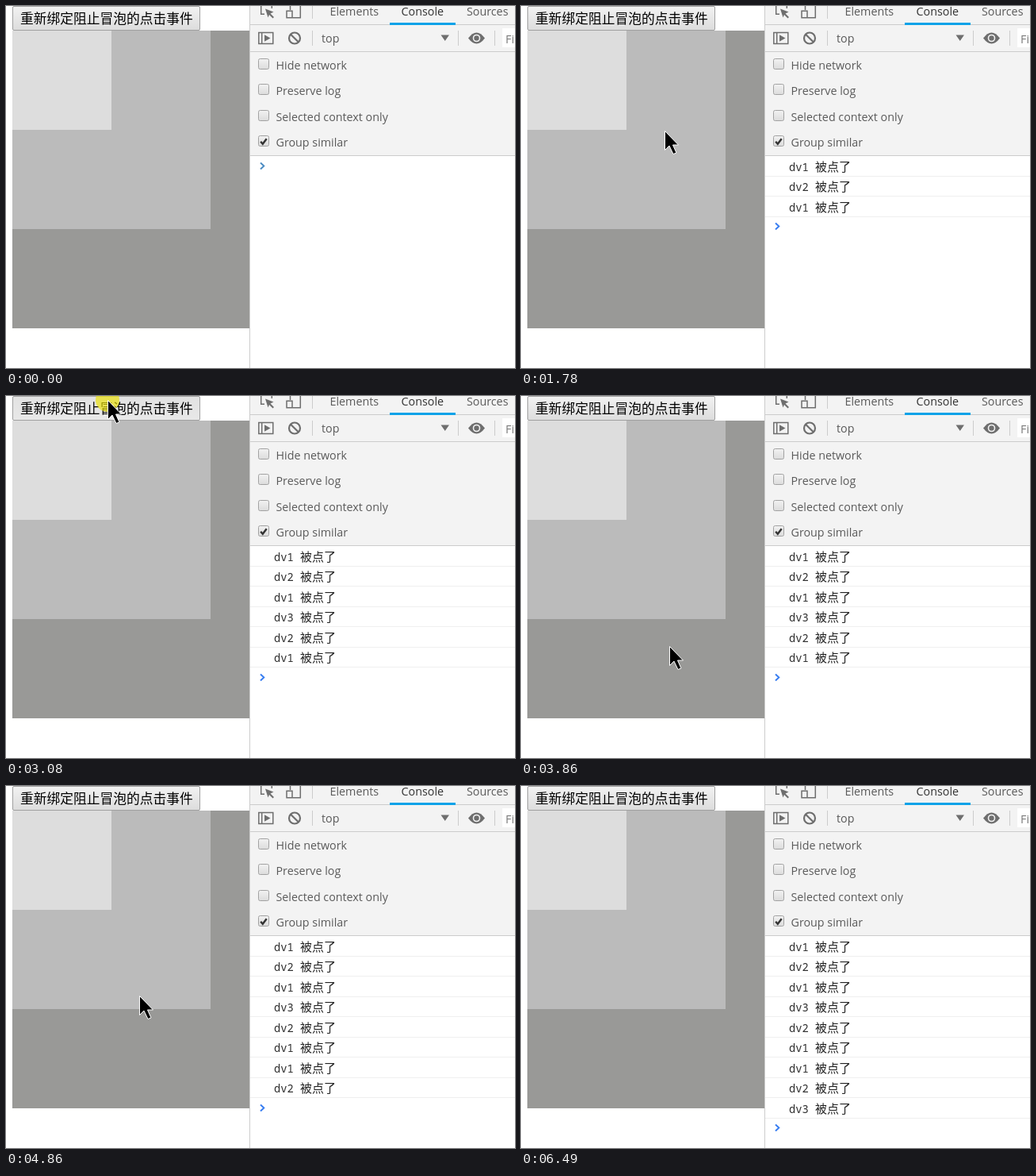
Write an HTML page that moves like this. It is 642 by 456 pixels and loops after 6.89 s.

```html
<!DOCTYPE html>
<html lang="zh-CN">
<head>
<meta charset="utf-8">
<title>Event bubbling</title>
<style>
  html, body { margin: 0; width: 100%; height: 100%; overflow: hidden; background: #fff; }
  svg { display: block; width: 642px; height: 456px; }
  text { white-space: pre; }
  .ui { font: 14.3px "Open Sans", "Noto Sans", sans-serif; fill: #5a5a5a; }
  .cjk { font: 15px "Noto Sans CJK SC", "Noto Sans CJK", sans-serif; fill: #222; }
  .mono { font: 13.75px "Noto Sans Mono", "DejaVu Sans Mono", monospace; fill: #303030; }
  .ui .selected { fill: #333; }
  .ui .hint { fill: #777; }
  .button-label { font-size: 16.75px; fill: #000; }
  .line { fill: none; stroke: #6e6e6e; stroke-width: 1.5; }
  .rule { stroke: #ccc; }
</style>
</head>
<body>
<svg viewBox="0 0 642 456">
  <defs>
    <linearGradient id="normal" x2="0" y2="1"><stop stop-color="#f2f2f2"/><stop offset="1" stop-color="#dcdcdc"/></linearGradient>
    <linearGradient id="hover" x2="0" y2="1"><stop stop-color="#f6f6f6"/><stop offset="1" stop-color="#e2e2e2"/></linearGradient>
    <linearGradient id="active" x2="0" y2="1"><stop stop-color="#e2e2e2"/><stop offset="1" stop-color="#e8e8e8"/></linearGradient>
  </defs>

  <rect x="8" y="31" width="299" height="375" fill="#999997"/>
  <rect x="8" y="31" width="250" height="250" fill="#bbb"/>
  <rect x="8" y="31" width="125" height="125" fill="#ddd"/>
  <rect id="button" x="8.5" y=".5" width="236" height="30" rx="1.5" fill="url(#normal)" stroke="#a0a0a0"/>
  <text class="cjk button-label" x="18" y="22">重新绑定阻止冒泡的点击事件</text>

  <rect x="308" width="334" height="188" fill="#f3f3f3"/>
  <path class="rule" d="M307.5 0V456M308 23.5H642M308 57.5H642M308 188.5H642M386.5 0V16M386.5 31V50M570.5 31V50M616.5 31V50"/>
  <rect x="484" y="21" width="83" height="3" fill="#0aa2e8"/>
  <g class="line">
    <path d="M321.7 0V10.3H326M335.3 0V3"/>
    <path d="M358.5 0V5M371.3 0V14.8H361M354 6.3H361V14.8H354Z"/>
    <path d="M318.8 33.5H336.8V47.5H318.8ZM322.7 34V48"/>
    <circle cx="364" cy="40.5" r="7" stroke-width="2.2"/>
    <path d="M359 35.7L369 45.5" stroke-width="2.2"/>
  </g>
  <g fill="#6e6e6e">
    <path d="M327 3.5L337.5 7.5 333.5 9.5 338 14 336.5 15.5 332 11 330.5 14.5Z"/>
    <path d="M326 36.2L333.5 40.5 326 44.7ZM548.5 36.5H559L553.75 44Z"/>
    <path d="M583 40.5Q593.5 26.5 604 40.5Q593.5 54.5 583 40.5Z"/>
  </g>
  <circle cx="593.5" cy="40.5" r="4" fill="#6e6e6e" stroke="#f3f3f3" stroke-width="1.6"/>
  <rect x="626" y="28" width="16" height="24" fill="#fff"/>
  <g class="ui">
    <text x="408.5" y="12">Elements</text>
    <text class="selected" x="498.5" y="12">Console</text>
    <text x="581" y="12">Sources</text>
    <text x="398" y="46">top</text>
    <text class="hint" x="630" y="46.5">Fi</text>
  </g>
  <g id="options"></g>
  <path d="M321.2 170.8L323.8 173.8 328.7 167.3" fill="none" stroke="#333" stroke-width="2.4"/>

  <g id="log"></g>
  <path id="prompt" d="M321 197.5L325.3 201.5 321 205.5" fill="none" stroke-width="1.9"/>

  <g id="pointer">
    <circle id="press" r="15" fill="#ebe000" fill-opacity=".65"/>
    <path d="M.5.5V24.5L6 19 11 29.5 15 28 10.5 18H17.5Z" fill="#000" stroke="#fff"/>
  </g>
</svg>
<script>
const LOOP = 6890, ROW = 25.5, SLACK = 4;
const $ = id => document.getElementById(id);

$('options').innerHTML = ['Hide network', 'Preserve log', 'Selected context only', 'Group similar']
  .map((label, i) => {
    const y = Math.round(i * 32.4);
    return `<rect x="318.5" y="${y + 66.5}" width="13" height="13" rx="2" fill="url(#normal)" stroke="#a2a2a2"/>
      <text class="ui" x="340.5" y="${y + 80}">${label}</text>`;
  }).join('');

$('log').innerHTML = [...'121321123'].map((n, i) => {
  const y = Math.floor(i * ROW);
  return `<g><text class="mono" x="338" y="${y + 208}">dv${n}</text>
    <text class="cjk" x="371" y="${y + 208}">被点了</text>
    <path d="M308 ${y + 214.5}H642" stroke="#efefef"/></g>`;
}).join('');
const rows = [...$('log').children];
const logTimes = [760, 1460, 1460, 2230, 2230, 2230, 4170, 4860, 5640];

// The pointer moves in held steps; a click, if any, falls on the last step.
const moves = [
  { start: 210, end: 590, steps: 6, from: [450, 411], to: [274, 349], release: 760 },
  { start: 990, end: 1290, steps: 5, to: [211, 214], release: 1460 },
  { start: 1690, end: 2070, steps: 7, to: [86, 102], bend: [155, 85], release: 2230 },
  { start: 2530, end: 2770, steps: 4, to: [128, 5] },
  { start: 3550, end: 4020, steps: 7, to: [183, 329], bend: [214, 241], release: 4170 },
  { start: 4400, end: 4710, steps: 5, to: [168, 264], release: 4860 },
  { start: 5090, end: 5480, steps: 7, to: [68, 111], release: 5640 },
  { start: 6020, end: 6490, steps: 7, to: [601, 459], leaves: true }
];
moves.forEach((m, i) => {
  m.from ??= moves[i - 1].to;
  m.bend ??= m.from.map((v, k) => (v + m.to[k]) / 2);
});

function position(m, time) {
  const gap = (m.end - m.start) / (m.steps - 1);
  const step = Math.floor((time - m.start + SLACK) / gap) + 1;
  const u = Math.min(1, step / (m.release ? m.steps - 1 : m.steps));
  const s = u * u * (3 - 2 * u);
  return m.from.map((v, k) => (1 - s) ** 2 * v + 2 * s * (1 - s) * m.bend[k] + s * s * m.to[k]);
}

function draw(time) {
  const count = logTimes.filter(at => time >= at).length;
  rows.forEach((row, i) => row.setAttribute('visibility', i < count ? 'visible' : 'hidden'));
  $('prompt').setAttribute('transform', `translate(0 ${Math.floor(count * ROW)})`);
  $('prompt').setAttribute('stroke', count ? '#367cf1' : '#4a8bc2');

  const move = moves.findLast(m => time >= m.start);
  const shown = move && !(move.leaves && time >= move.end);
  $('pointer').setAttribute('visibility', shown ? 'visible' : 'hidden');
  let buttonState = 'normal', pressed = false;
  if (shown) {
    const [x, y] = position(move, time).map(Math.round);
    const overButton = x >= 8 && x < 245 && y < 31;
    const buttonPress = time >= 3080 && time < 3250;
    pressed = buttonPress || (time >= move.end && time < move.release);
    if (overButton) buttonState = buttonPress ? 'active' : 'hover';
    $('pointer').setAttribute('transform', `translate(${x} ${y})`);
  }
  $('press').setAttribute('display', pressed ? 'inline' : 'none');
  $('button').setAttribute('fill', `url(#${buttonState})`);
}

function tick() {
  draw(performance.now() % LOOP);
  requestAnimationFrame(tick);
}
tick();
</script>
</body>
</html>
```
